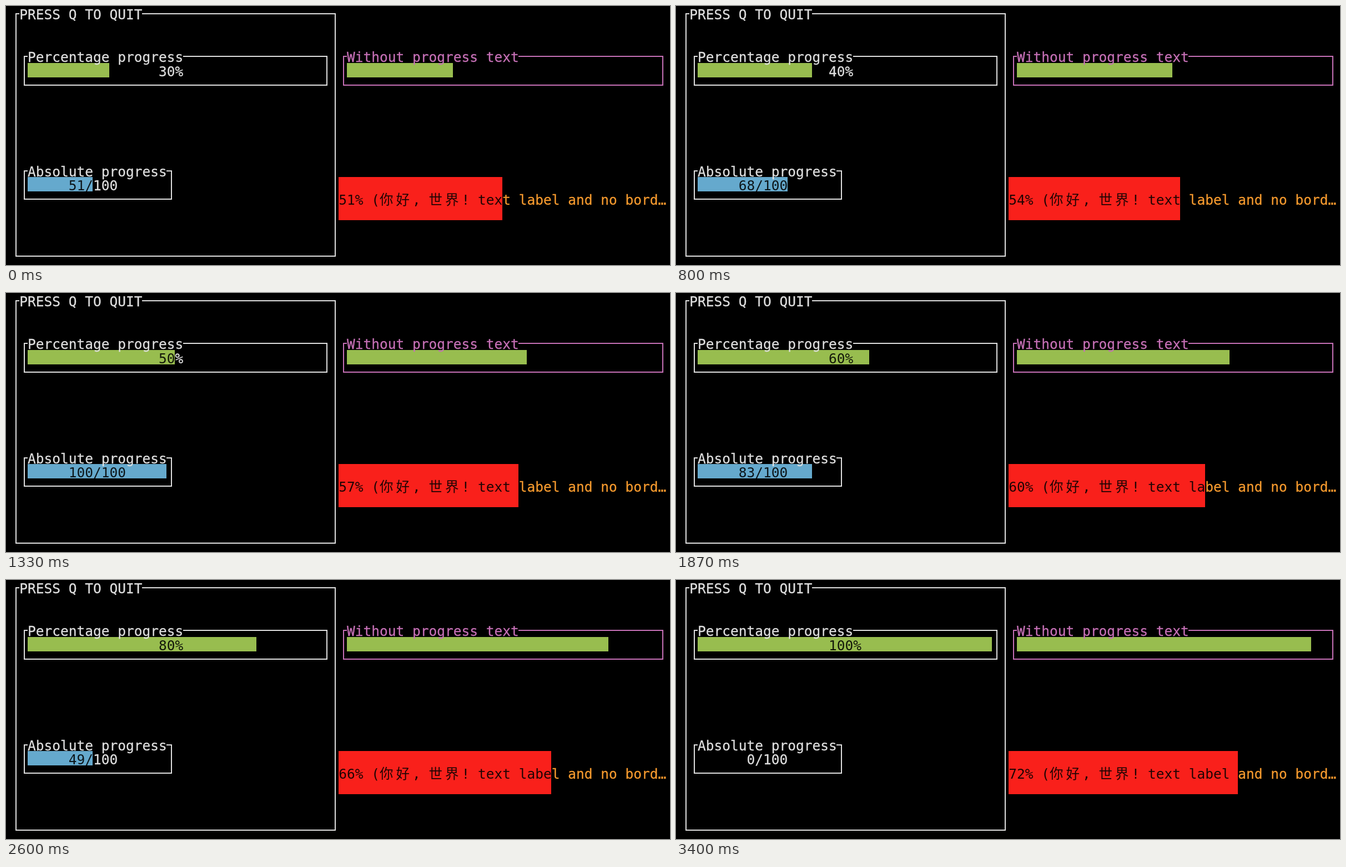
These frames come from a looping animation (1196 px wide and 468 px high, 3470 ms). An HTML page:

```html
<!DOCTYPE html>
<html lang="en">
<head>
<meta charset="utf-8">
<title>Terminal gauges</title>
<style>
  html, body { margin: 0; width: 100%; height: 100%; overflow: hidden; background: #000; }
  svg { display: block; width: 1196px; height: 468px; }
  text {
    font: 300 24.48px "DejaVu Sans Mono", "Noto Sans CJK SC", "Noto Sans CJK", monospace;
    white-space: pre;
  }
</style>
</head>
<body>
<svg id="stage" viewBox="0 0 1196 468"></svg>
<script>
const NS = 'http://www.w3.org/2000/svg';
const stage = document.getElementById('stage');
const LOOP = 3470;
const WHITE = '#dedede', PINK = '#c670b6', GREEN = '#98bd4f';
const BLUE = '#65a9cd', RED = '#f9201b', ORANGE = '#f4992e';
const DARK = 'rgba(0, 0, 0, .88)';

// Terminal grid
const CELL_W = 14.745, CELL_H = 25.8;
const colX = c => 9.52 + c * CELL_W;
const rowY = r => -0.2 + r * CELL_H;
const edgeX = c => Math.floor(colX(c));

function add(parent, tag, attrs) {
  const node = document.createElementNS(NS, tag);
  for (const key in attrs) node.setAttribute(key, attrs[key]);
  return parent.appendChild(node);
}

function rect(x, y, width, height, fill) {
  return add(stage, 'rect', { x, y, width, height, fill });
}

const isWide = ch => ch >= '\u4e00' && ch <= '\u9fff';

// Writes one glyph per cell; the color depends on the column.
function write(node, str, col, colorAt) {
  node.textContent = '';
  for (const ch of str) {
    const fill = colorAt(col);
    const stroke = fill === DARK ? 'none' : fill;
    add(node, 'tspan', { x: colX(col), fill, stroke, 'stroke-width': .3 }).textContent = ch;
    col += isWide(ch) ? 2 : 1;
  }
}

const textRow = row => add(stage, 'text', { y: rowY(row) + 24 });

function frame(c0, r0, c1, r1, title, color) {
  const left = Math.round(colX(c0 + .5)), right = Math.round(colX(c1 + .5));
  const top = Math.round(rowY(r0 + .5)), bottom = Math.round(rowY(r1 + .5));
  const titleX = edgeX(c0 + 1), titleEnd = edgeX(c0 + 1 + title.length);
  rect(left, top, titleX - left, 2, color);
  rect(titleEnd, top, right + 2 - titleEnd, 2, color);
  rect(left, bottom, right + 2 - left, 2, color);
  rect(left, top, 2, bottom + 2 - top, color);
  rect(right, top, 2, bottom + 2 - top, color);
  write(textRow(r0), title, c0 + 1, () => color);
}

function gauge(col, row, cols, rows, fill, ink) {
  const x = edgeX(col), y = Math.round(rowY(row));
  const bar = rect(x, y, 0, Math.round(rowY(row + rows)) - y, fill);
  const label = textRow(row + (rows - 1) / 2);
  return (value, str, len = str.length) => {
    const end = col + Math.floor(cols * value / 100);
    bar.setAttribute('width', edgeX(end) - x);
    const start = col + Math.floor((cols - len) / 2);
    write(label, str, start, c => c < end ? DARK : ink);
  };
}

const percent = gauge(2, 4, 36, 1, GREEN, WHITE);
const plain = gauge(41, 4, 38, 1, GREEN, WHITE);
const absolute = gauge(2, 12, 17, 1, BLUE, WHITE);
const labelled = gauge(40, 12, 40, 3, RED, ORANGE);

frame(0, 0, 39, 17, 'PRESS Q TO QUIT', WHITE);
frame(1, 3, 38, 5, 'Percentage progress', WHITE);
frame(1, 11, 19, 13, 'Absolute progress', WHITE);
frame(40, 3, 79, 5, 'Without progress text', PINK);

// The plain gauge moves on every tick, the others on every second one.
const TICKS = [130, 400, 670, 930, 1130, 1400, 1670, 1930, 2130, 2400, 2670, 2930, 3130, 3400];
const COUNTS = [51, 68, 100, 83, 66, 49, 32, 0];

let shown = -1;
function draw(tick) {
  if (tick === shown) return;
  shown = tick;
  const k = Math.floor(tick / 2);
  const pct = 30 + 10 * k, part = 51 + 3 * k;
  percent(pct, pct + '%');
  plain(100 - Math.abs(65 - 5 * tick), '');
  absolute(COUNTS[k], COUNTS[k] + '/100');
  labelled(part, part + '% (你好, 世界! text label and no bord…', 40);
}

let origin = null;
function loop(now) {
  if (origin === null) origin = now;
  const t = Math.max(0, now - origin) % LOOP;
  draw(TICKS.filter(at => at <= t).length);
  requestAnimationFrame(loop);
}
draw(0);
requestAnimationFrame(loop);
</script>
</body>
</html>
```
